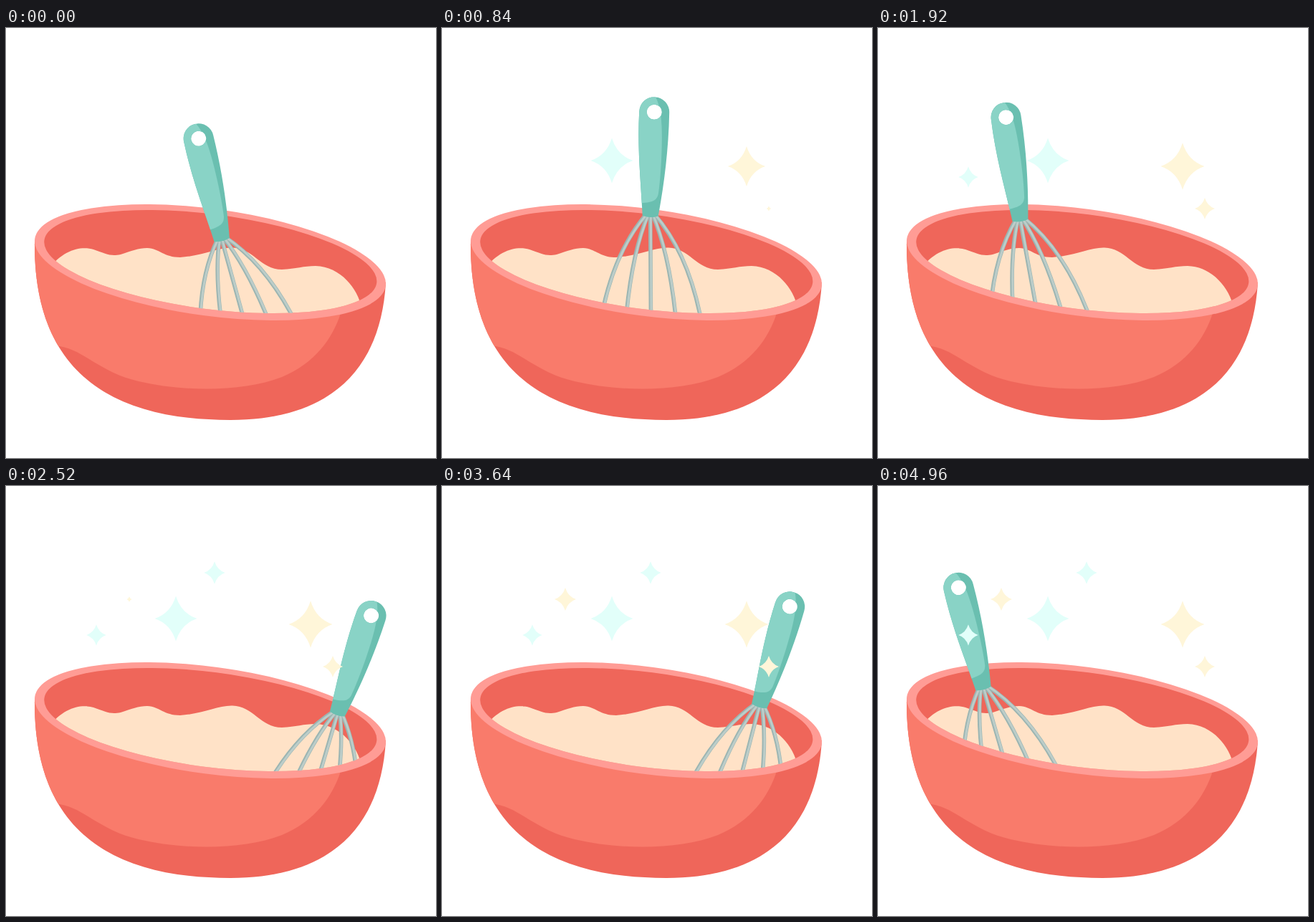
Write an HTML page that moves like this. It is 600 px wide and 600 px high and loops after 5000 ms.

```html
<!DOCTYPE html>
<html lang="en">
<head>
<meta charset="utf-8">
<title>Whisking batter</title>
<style>
  html, body { margin: 0; width: 100%; height: 100%; overflow: hidden; background: #fff; }
  svg { display: block; width: 100vw; height: 100vh; }
  .wire { fill: none; stroke: #9cb5b2; stroke-width: 5.6; }
  .shine { fill: none; stroke: #bccdc9; stroke-width: 3; transform: translateX(.7px); }
</style>
</head>
<body>
<svg viewBox="0 0 600 600">
  <defs>
    <ellipse id="inner" cx="285.3" cy="326" rx="233.8" ry="66.2" transform="rotate(7.3 285.3 326)"/>
    <path id="body" d="M40 298C38 485 152 547 313 547C455 547 523 474 530 355L285 300Z"/>
    <path id="handle" clip-rule="evenodd"
      d="M-11 0C-14 -40 -22 -90 -21 -145A21 21 0 0 1 21 -145C22 -90 17 -40 11 0Q0 4 -11 0Z
         M-10.5 -145a10.5 10.5 0 1 0 21 0a10.5 10.5 0 1 0 -21 0Z"/>
    <g id="wires"></g>
    <clipPath id="inBowl"><use href="#inner"/></clipPath>
    <clipPath id="inBody"><use href="#body"/></clipPath>
    <clipPath id="inHandle"><use href="#handle"/></clipPath>
    <clipPath id="aboveRim">
      <path d="M0 0H600V367L517 356L53 297L0 290Z"/>
      <use href="#inner"/>
    </clipPath>
  </defs>

  <use href="#body" fill="#ef665a"/>
  <path clip-path="url(#inBody)" fill="#f97b6b"
    d="M30 290V440L75 444C110 450 130 480 185 493C250 508 330 508 385 487C430 468 455 435 467 398V330Z"/>
  <ellipse cx="285" cy="327" rx="247" ry="74.7" transform="rotate(7.63 285 327)" fill="#ff9c95"/>
  <use href="#inner" fill="#ef665a"/>
  <path clip-path="url(#inBowl)" fill="#ffe2c7"
    d="M60 336C80 309 105 304 122 309C140 315 145 319 160 316C175 311 185 307 197 307
       C215 308 220 320 243 320C275 318 295 306 316 306.500C345 307 355 337 385 337
       C405 336 415 332 432 332C467 333 491 364 496 390V420H60Z"/>

  <g id="back"></g>
  <g clip-path="url(#aboveRim)">
    <g id="whisk">
      <g transform="rotate(-2.5)">
        <use href="#wires" class="wire"/>
        <use href="#wires" class="shine"/>
      </g>
      <g clip-path="url(#inHandle)">
        <path fill="#6abfb0" d="M-30 -180H30V10H-30Z"/>
        <path fill="#89d3c6" d="M-30 -180L0 -168C9 -153 11 -133 12 -110C13 -80 12 -50 10 -31C8 -20 0 -17 -30 -17Z"/>
      </g>
    </g>
  </g>
  <g id="front"></g>
</svg>
<script>
const LOOP = 5000, LAP = 1000, STEP = 40, TURN = 530, BACK = 450, GROW = 320;
const CYAN = '#e2fffa', YELLOW = '#fff6d9';
const $ = id => document.getElementById(id);

function addPath(parent, d, fill = '') {
  const el = document.createElementNS('http://www.w3.org/2000/svg', 'path');
  el.setAttribute('d', d);
  if (fill) el.setAttribute('fill', fill);
  return parent.appendChild(el);
}

// Five wires fan out from the neck
for (let i = -2; i <= 2; i++) {
  addPath($('wires'), `M${2.5 * i} -3C${16 * i} 28 ${28 * i} 75 ${34.5 * i} 140L${35.5 * i} 152`);
}

// Whisk poses: x, y, tilt. Each stroke is a Bezier between the two ends of the bowl.
const left = [120, 293, -17], right = [467, 317, 19.3];
const nearSide = [left, [205, 307, -4.7], [383, 336, 14], right];
const farSide = [right, [467, 330, 19], [325, 205, 7.6], left];

const bezier = ([a, b, c, d], u) => a.map((_, i) =>
  a[i] * (1 - u) ** 3 + 3 * b[i] * u * (1 - u) ** 2 + 3 * c[i] * u * u * (1 - u) + d[i] * u ** 3);

function pose(t) {
  const p = (t + LAP - TURN) % LAP;
  if (p < BACK) return bezier(farSide, p / BACK);
  const u = (p - BACK) / (LAP - BACK);
  const [x, y, tilt] = bezier(nearSide, u);
  // The very first stroke sets off from the middle of the bowl
  const lead = t < TURN ? 1 - u : 0;
  return [x + 178 * lead, y + lead, tilt + 2.8 * lead];
}

// Stars: colour, centre, half width, time of appearing, layer
const stars = [
  [CYAN, 237, 185, 29.5, 80, 'front'],
  [YELLOW, 425, 193, 30.5, 640, 'front'],
  [YELLOW, 456, 252, 14, 800, 'front'],
  [CYAN, 126, 208, 13.7, 960, 'front'],
  [CYAN, 291, 121, 14.7, 2080, 'front'],
  [YELLOW, 172, 158, 15, 2480, 'back']
].map(([color, x, y, size, born, layer]) => ({
  x, y, size, born,
  el: addPath($(layer), 'M0 -1.07Q.25 -.25 1 0Q.25 .25 0 1.07Q-.25 .25 -1 0Q-.25 -.25 0 -1.07Z', color)
}));

function draw(t) {
  const [x, y, tilt] = pose(t);
  $('whisk').setAttribute('transform', `translate(${x} ${y}) rotate(${tilt})`);
  for (const s of stars) {
    const u = Math.min(1, Math.max(0, (t - s.born) / GROW));
    const scale = s.size * u * (2 - u);
    s.el.setAttribute('transform', `translate(${s.x} ${s.y}) scale(${scale})`);
  }
}

function tick() {
  const t = performance.now() % LOOP;
  draw(Math.floor(t / STEP) * STEP);
  requestAnimationFrame(tick);
}
draw(0);
requestAnimationFrame(tick);
</script>
</body>
</html>
```
